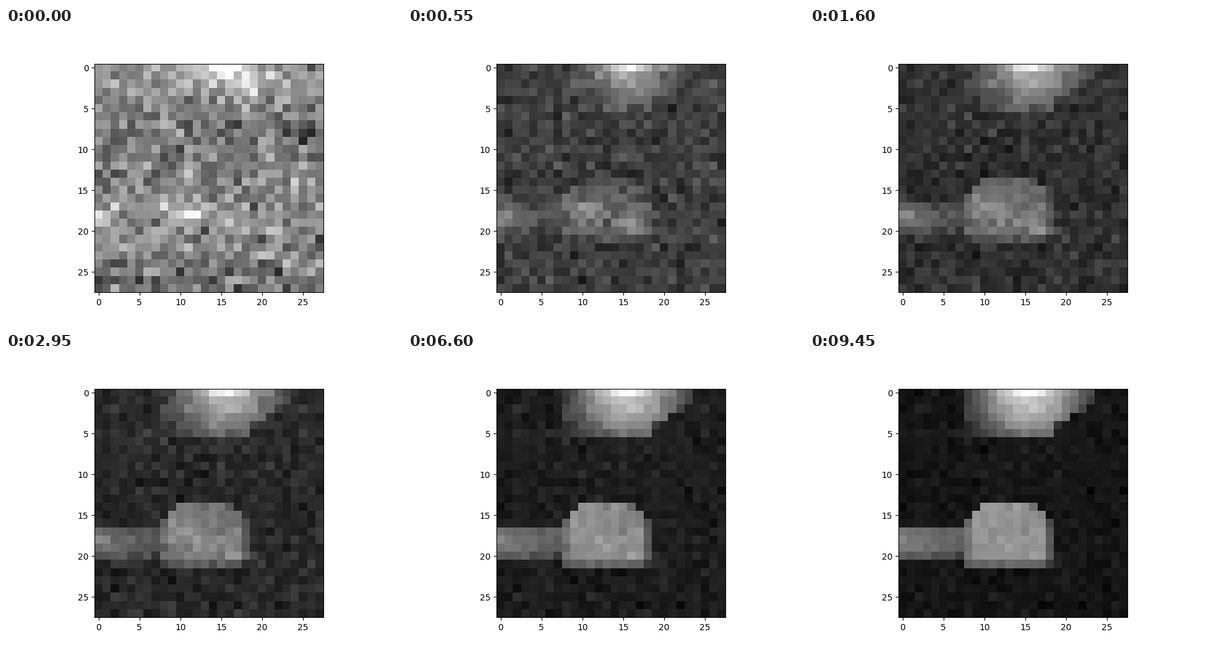
A matplotlib script for the animation above (10000 ms loop, 640 by 480 pixels).

```python
import numpy as np
import matplotlib.pyplot as plt
from matplotlib.animation import FuncAnimation

SIZE = 28
FRAMES = 200
KNOTS = 7  # independent noise fields, evenly spaced in log time

rng = np.random.default_rng(7)
row, col = np.mgrid[:SIZE, :SIZE].astype(float)


def spot(r, c, height, width, peak=1.0):
    return peak * np.exp(-((row - r) / height) ** 2 - ((col - c) / width) ** 2)


def span(left, right):
    """Coverage of each cell by the columns left..right, with soft ends."""
    return np.clip(np.minimum(col - left, right - col) + 1, 0, 1)


def upper_shape():
    right = np.maximum(23.3 - 1.6 * np.clip(row - 1, 0, None), 18)
    glow = .8 * np.exp(-((col - 15.5) / 7) ** 2) * (1 - .4 * (row / 5) ** 2)
    return np.where(row <= 5, glow * span(8, right), 0) + spot(0, 15.5, .6, 4, .2)


def lower_shape():
    rise = np.clip((17 - row) / 4, 0, 1)
    half = 5.3 * np.sqrt(1 - rise ** 2) - .5
    dome = .58 * span(13 - half, 12.8 + half) * np.where(row == 21, .7, 1)
    dome[(row < 14) | (row > 21)] = 0
    arm = .49 - .02 * col + .012 * np.clip(col - 4, 0, None)
    arm *= np.where(row == 20, .75, 1)
    arm[(row < 17) | (row > 20) | (col > 7)] = 0
    return np.maximum(dome, arm)


def noise_fields():
    fields = [rng.normal(size=(SIZE, SIZE))]
    for _ in range(KNOTS):
        fresh = rng.normal(size=(SIZE, SIZE))
        fields.append(.6 * fields[-1] + .8 * fresh)
    return np.clip(fields, -2.6, 2.4)


scene = np.clip(upper_shape() + lower_shape() - .085, 0, None)
noise = noise_fields()

# Areas that emerge first.
early = np.maximum.reduce([
    spot(0, 16, 4.5, 5) + spot(0, 16.5, .7, 3, .5),
    spot(17.5, 10.5, 1.8, 2.5, 1.2),
    spot(18.3, .5, 1.5, 2.2, 1.4),
    spot(19.5, 16, 2.2, 1.6),
])

# Broad banding of the first moments, fading out quickly.
bands = .06 * np.cos(2 * np.pi * row / 18) - .05 * (row / SIZE - .5)


def picture(step):
    p = step / FRAMES
    u = np.log1p(step)
    done = u / np.log(FRAMES)

    i, w = divmod(done * KNOTS, 1)
    i = int(i)
    grain = noise[i] + w * (noise[min(i + 1, KNOTS)] - noise[i])

    level = .14 * (1 - .6 * p) + .38 * np.exp(-u / 2)
    spread = .05 * (1 - .6 * p) + .075 * np.exp(-u / 1.5)
    dim, bright = done ** 2, .45 + .55 * done ** 2
    gain = early * bright + (1 - early) * dim

    img = level + bands * np.exp(-u) + spread * grain + scene * gain
    return np.clip(img, 0, 1)


fig, ax = plt.subplots(figsize=(6.4, 4.8), dpi=100)
image = ax.imshow(picture(0), cmap="gray", vmin=0, vmax=1)


def update(step):
    image.set_data(picture(step))
    return [image]


anim = FuncAnimation(fig, update, frames=FRAMES, interval=50,
                     repeat=True, repeat_delay=0)
plt.show()
```
